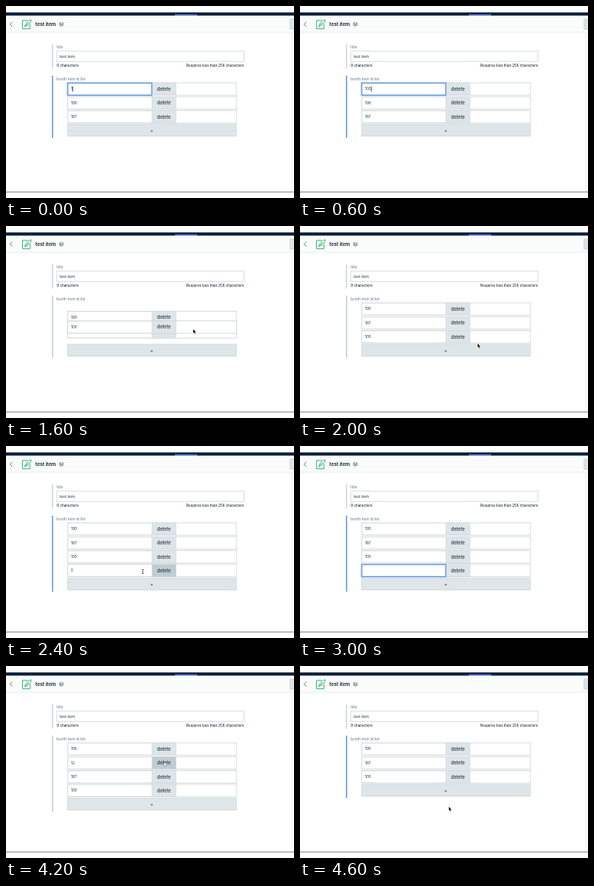
Animation, 360 px wide and 240 px high, one loop 4800 ms. Source, as an HTML page with a canvas:

```html
<!DOCTYPE html>
<html lang="en">
<head>
<meta charset="utf-8">
<title>Editable item list</title>
<style>
  html, body { margin: 0; width: 100%; height: 100%; overflow: hidden; background: #fff; }
  canvas { display: block; width: 360px; height: 240px; }
</style>
</head>
<body>
<canvas id="stage"></canvas>
<script>
const LOOP = 4800, STEP = 200;
const ROW_TOP = 96, PITCH = 17.3, ROW_H = 15.6;
const INK = '#28343d', BLUE = '#3f7fd0', GRAY = '#b9c1c7';
const FONT = 'Inter, "Liberation Sans", sans-serif';

const canvas = document.getElementById('stage');
const ctx = canvas.getContext('2d');
const ratio = window.devicePixelRatio || 1;
canvas.width = 360 * ratio;
canvas.height = 240 * ratio;

// Every scene extends the one before it; rows are [text, slot].
const changes = [
  [0, { rows: [['1', 0], ['190', 1], ['187', 2]], focus: 0, caret: 1, active: true, hover: null, cursor: null, slots: 3 }],
  [200, { rows: [['10', 0], ['190', 1], ['187', 2]], caret: 2 }],
  [600, { rows: [['100', 0], ['190', 1], ['187', 2]], caret: 3 }],
  [800, { caret: null, hover: 1, cursor: ['hand', 198, 120] }],
  [1000, { focus: 1, caret: 0, hover: null, cursor: ['beam', 154.5, 118] }],
  [1200, { cursor: ['arrow', 234, 107] }],
  [1400, { focus: null, caret: null, active: false, cursor: ['arrow', 235, 108] }],
  [1600, { rows: [['190', 0.6], ['187', 1.65], ['100', 1.3]], cursor: ['arrow', 234, 129] }],
  [1800, { rows: [['190', 0], ['187', 1], ['100', 2]], cursor: ['arrow', 235, 141] }],
  [2000, { cursor: ['arrow', 222, 147] }],
  [2200, { hover: 'add', cursor: ['hand', 190, 155] }],
  [2400, { rows: [['190', 0], ['187', 1], ['100', 2], ['0', 3]], slots: 4, active: true, hover: 3, cursor: ['beam', 171, 157] }],
  [2600, { focus: 3, caret: 1, hover: null, cursor: ['beam', 130, 157] }],
  [3000, { rows: [['190', 0], ['187', 1], ['100', 2], ['', 3]], caret: null, cursor: null }],
  [3200, { rows: [['190', 0], ['187', 1], ['100', 2], ['1', 3]], caret: 1 }],
  [3400, { rows: [['190', 0], ['187', 1], ['100', 2], ['12', 3]], caret: 2, hover: 3, cursor: ['hand', 203, 156] }],
  [3600, { focus: null, caret: null, active: false, hover: null, cursor: ['arrow', 224, 156] }],
  [3800, { rows: [['190', 0], ['187', 1.52], ['100', 2.78], ['12', 0.59]], cursor: ['arrow', 225, 115] }],
  [4000, { rows: [['190', 0], ['12', 1], ['187', 2], ['100', 3]], cursor: ['arrow', 224, 117] }],
  [4200, { hover: 1, cursor: ['hand', 198, 121] }],
  [4400, { rows: [['190', 0], ['187', 1], ['100', 2]], slots: 3, active: true }],
  [4600, { hover: null, cursor: ['arrow', 186, 176] }]
];

function sceneAt(time) {
  return changes.reduce((scene, [start, patch]) =>
    start <= time ? { ...scene, ...patch } : scene, {});
}

function fill(x, y, w, h, color) {
  ctx.fillStyle = color;
  ctx.fillRect(x, y, w, h);
}

function outline(x, y, w, h, color, width = 0.7) {
  ctx.strokeStyle = color;
  ctx.lineWidth = width;
  ctx.strokeRect(x, y, w, h);
}

function path(points, color, width, closed = false) {
  ctx.beginPath();
  points.forEach(([x, y]) => ctx.lineTo(x, y));
  if (closed) ctx.closePath();
  ctx.strokeStyle = color;
  ctx.lineWidth = width;
  ctx.stroke();
}

function label(text, x, y, size = 4.6, color = INK, weight = 400, align = 'left') {
  ctx.font = `${weight} ${size}px ${FONT}`;
  ctx.textAlign = align;
  ctx.textBaseline = 'alphabetic';
  ctx.fillStyle = color;
  ctx.fillText(text, x, y);
}

function drawHeader() {
  fill(0, 8, 360, 4, '#14263f');
  fill(211, 10.3, 28, 1.7, '#4f70c4');
  fill(0, 12, 360, 21, '#fafbfb');
  fill(0, 32.6, 360, 0.7, '#dfe3e5');
  path([[8, 19.8], [5, 22.8], [8, 25.8]], '#64717b', 0.9);

  const green = '#35b779';
  path([[27, 18], [20.6, 18], [20.6, 28.4], [30, 28.4], [30, 22.5]], green, 1);
  path([[23.5, 26], [25, 22], [28.5, 18], [31.5, 17.3], [31, 20], [27, 24], [24.5, 25]], green, 0.9, true);
  path([[23, 26.5], [28.5, 20.5]], green, 0.8);

  label('test item', 36.8, 25, 6, INK, 700);
  ctx.fillStyle = '#9ba8ae';
  ctx.beginPath();
  ctx.arc(69.2, 22.6, 2.9, 0, Math.PI * 2);
  ctx.fill();
  label('?', 69.2, 24.3, 4.6, '#fff', 700, 'center');

  fill(355, 16.5, 5, 12.5, '#dce3e7');
  outline(355, 16.5, 8, 12.5, '#c4ced3');
  fill(357, 33, 0.7, 199, '#e4e7e9');
  fill(0, 232, 360, 1, '#8a8d90');
}

function drawTitleField() {
  fill(57.6, 48, 1, 30, GRAY);
  label('title', 63.3, 53, 4.6, '#5b7284');
  outline(63.3, 56.2, 234.2, 13, '#c9d0d4');
  label('test item', 67, 64.6, 4.7);
  label('9 characters', 63.3, 76.4, 4.55, INK, 500);
  label('Requires less than 256 characters', 297.4, 76.4, 4.45, INK, 500, 'right');
}

function drawRow(scene, [text, slot], index) {
  const y = ROW_TOP + slot * PITCH;
  const focused = scene.focus === index;
  fill(77, y, 211, ROW_H, '#fff');
  outline(77, y, 211, ROW_H, '#c6ced3');
  fill(182.5, y, 30, ROW_H, scene.hover === index ? '#bfccd3' : '#dde5e9');
  outline(182.5, y, 30, ROW_H, '#cbd4d9', 0.5);
  label('delete', 197.5, y + 9.9, 5.7, INK, 500, 'center');
  if (focused) {
    outline(76.8, y, 105.7, ROW_H, '#cfe1f8', 2.4);
    outline(77.2, y + 0.2, 105, ROW_H - 0.4, BLUE, 0.9);
  } else {
    outline(77.5, y + 0.7, 104.8, ROW_H - 1.4, '#d9dfe2', 0.5);
  }
  label(text, 81, y + 9.2, 4.7);
  if (focused && scene.caret !== null) {
    const x = 81 + ctx.measureText(text.slice(0, scene.caret)).width;
    fill(x, y + 4.4, 0.7, 6.6, '#111');
  }
}

function drawList(scene) {
  const addTop = ROW_TOP + scene.slots * PITCH;
  fill(57.6, 87, 1.2, addTop + 17 - 87, scene.active ? BLUE : GRAY);
  label('booth item id list', 63.3, 92.8, 4.6, '#5b7284');
  fill(77, addTop, 211, 14.8, scene.hover === 'add' ? '#c4d0d6' : '#dfe6e9');
  outline(77, addTop, 211, 14.8, '#c6d0d5', 0.7);
  label('+', 182, addTop + 9.7, 5.6, INK, 500, 'center');
  scene.rows.forEach((row, index) => drawRow(scene, row, index));
}

function drawCursor([kind, x, y]) {
  ctx.save();
  ctx.translate(x, y);
  if (kind === 'beam') {
    path([[-1.3, -2.8], [0, -2.2], [1.3, -2.8]], '#222', 0.6);
    path([[0, -2.2], [0, 2.2]], '#222', 0.7);
    path([[-1.3, 2.8], [0, 2.2], [1.3, 2.8]], '#222', 0.6);
  } else {
    const shape = kind === 'arrow'
      ? [[0, 0], [0, 4.7], [1.1, 3.8], [2, 5.7], [2.9, 5.2], [2.1, 3.5], [3.5, 3.4]]
      : [[-0.5, -2], [0.5, -2], [0.7, 0.3], [3, 0.9], [2.6, 4], [-0.5, 4], [-2, 1.5], [-0.5, 1.8]];
    path(shape, '#fff', 1, true);
    ctx.fillStyle = kind === 'arrow' ? '#111' : '#fff';
    ctx.fill();
    if (kind === 'hand') path(shape, '#222', 0.5, true);
  }
  ctx.restore();
}

function draw(time) {
  const scene = sceneAt(time);
  ctx.setTransform(ratio, 0, 0, ratio, 0, 0);
  fill(0, 0, 360, 240, '#fff');
  drawHeader();
  drawTitleField();
  drawList(scene);
  if (scene.cursor) drawCursor(scene.cursor);
}

const startTime = performance.now();
function tick() {
  const elapsed = (performance.now() - startTime) % LOOP;
  draw(Math.floor(elapsed / STEP) * STEP);
  requestAnimationFrame(tick);
}
tick();
</script>
</body>
</html>
```
